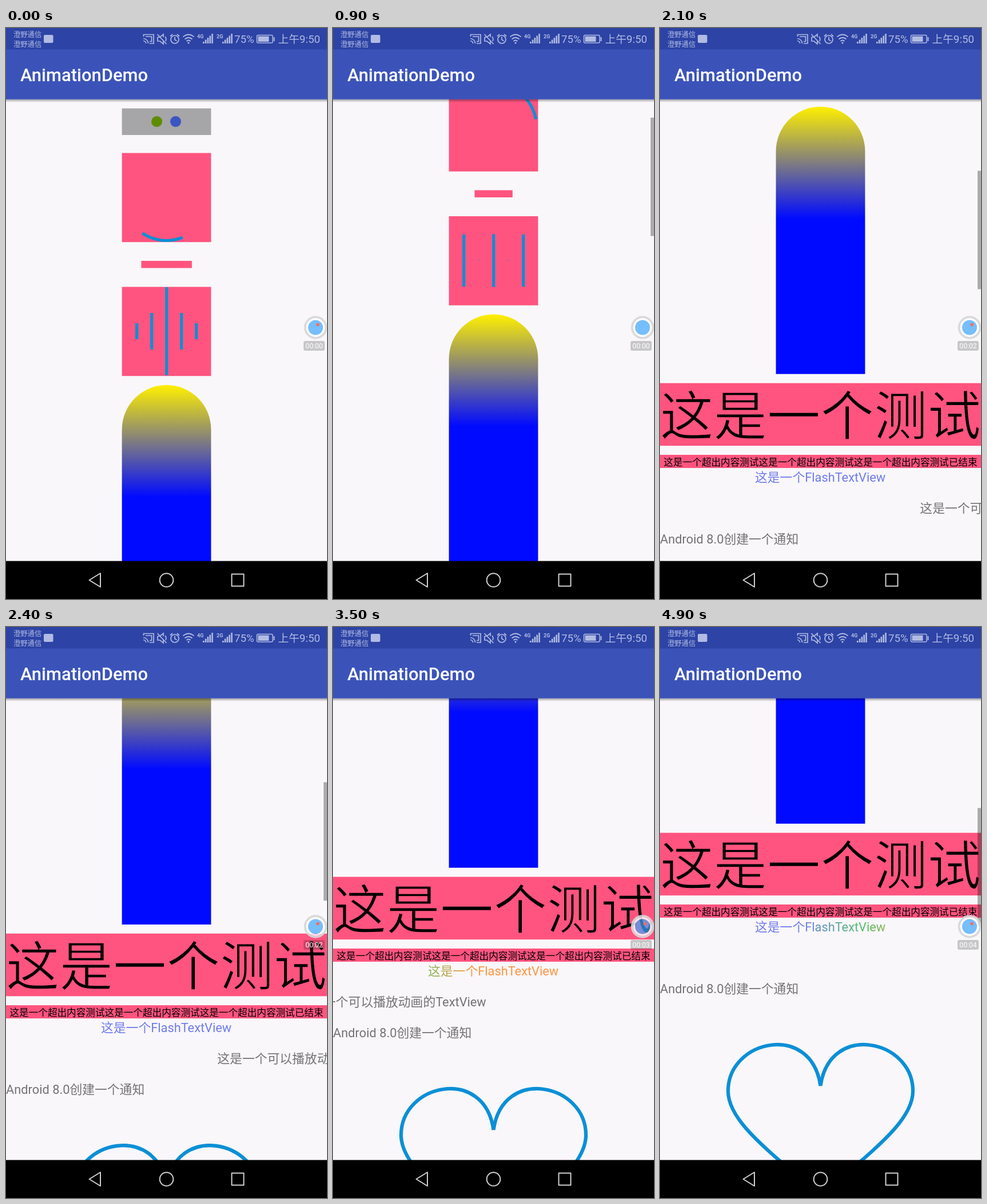
Animation, 561 px wide and 998 px high, one loop 5 s. Source, as an HTML page:

```html
<!DOCTYPE html>
<html lang="zh-CN">
<head>
<meta charset="utf-8">
<title>AnimationDemo</title>
<style>
  html, body { margin: 0; width: 100%; height: 100%; overflow: hidden; background: #f9f7fa; }
  svg { display: block; width: 561px; height: 998px; }
  text { font-family: Roboto, "Noto Sans CJK SC", "Noto Sans CJK", sans-serif; white-space: pre; }
  .pink { fill: #ff547f; }
  .line { fill: none; stroke: #0b8fd6; }
  .body { font-size: 21.8px; fill: #737275; }
  .status { fill: #b1bbe3; }
  .glyph { fill: none; stroke: #b1bbe3; stroke-width: 1.7; }
  .nav { fill: none; stroke: #d0d0d0; stroke-width: 2; stroke-linejoin: round; }
  /* The band-coloured outline thins the large glyphs. */
  .headline { font-size: 93.5px; stroke: #ff547f; stroke-width: 1.6px; }
</style>
</head>
<body>
<svg viewBox="0 0 561 998" lang="zh-CN">
  <defs>
    <linearGradient id="column" gradientUnits="userSpaceOnUse" x1="0" y1="624" x2="0" y2="820">
      <stop offset="0" stop-color="#fff000"/>
      <stop offset="1" stop-color="#000aff"/>
    </linearGradient>
    <linearGradient id="flash" gradientUnits="userSpaceOnUse" x1="166" y1="0" x2="395" y2="0">
      <stop offset="0" stop-color="#6f7bee"/>
      <stop offset=".5" stop-color="#52c264"/>
      <stop offset="1" stop-color="#ff9440"/>
    </linearGradient>
    <linearGradient id="shade" x1="0" y1="0" x2="0" y2="1">
      <stop offset="0" stop-color="#000" stop-opacity=".36"/>
      <stop offset="1" stop-color="#000" stop-opacity="0"/>
    </linearGradient>
    <clipPath id="page"><rect y="124" width="561" height="808"/></clipPath>
  </defs>

  <rect width="561" height="998" fill="#f9f7fa"/>

  <g clip-path="url(#page)">
    <g id="content">
      <rect x="202.600" y="140.500" width="155.800" height="46.500" fill="#a6a5a8"/>
      <circle id="dotA" cy="163.500" r="9.500" fill="#5f8d00"/>
      <circle id="dotB" cy="163.500" r="9.500" fill="#3c55c2"/>

      <rect class="pink" x="202.600" y="218.500" width="155.800" height="155.700"/>
      <path id="arc" class="line" stroke-width="5.200"/>

      <rect id="strip" class="pink" y="407" height="12.500"/>

      <rect class="pink" x="202.600" y="452.500" width="155.800" height="155.700"/>
      <path id="bars" class="line" stroke-width="5.200"/>

      <path d="M202.600 1091.300V701.900a77.900 77.900 0 0 1 155.800 0V1091.300Z" fill="url(#column)"/>

      <rect class="pink" y="1107.200" width="561" height="109.500"/>
      <text class="headline" x="0" y="1198">这是一个测试</text>
      <rect class="pink" y="1232.500" width="561" height="23"/>
      <text x="280.500" y="1251" font-size="16.620" text-anchor="middle">这是一个超出内容测试这是一个超出内容测试这是一个超出内容测试已结束</text>
      <text x="166" y="1279.500" font-size="21.800" fill="url(#flash)">这是一个FlashTextView</text>
      <text id="slide" class="body" y="1333">这是一个可以播放动画的TextView</text>
      <text class="body" x="0" y="1387">Android 8.0创建一个通知</text>

      <path class="line" stroke-width="6.200" d="M280.500 1549.500C264.500 1437.500 119 1468.500 119 1558.500C119 1612 190 1662 280.500 1742.500C371 1662 442 1612 442 1558.500C442 1468.500 296.500 1437.500 280.500 1549.500"/>
    </g>
    <rect id="thumb" x="555" width="6" height="207" fill="#000"/>
    <rect y="124.500" width="561" height="5.500" fill="url(#shade)"/>
  </g>

  <rect width="561" height="124.700" fill="#3b53b9"/>
  <rect width="561" height="37.500" fill="#2d43a5"/>
  <text x="25" y="93" font-size="30.950" font-weight="500" fill="#fff">AnimationDemo</text>

  <g class="status">
    <text x="13" y="15.500" font-size="12.300">澄野通信</text>
    <text x="13" y="32.500" font-size="12.300">澄野通信</text>
    <rect x="66" y="12" width="16.500" height="14" rx="2"/>
    <text x="334" y="17.500" font-size="9" font-weight="700">4G</text>
    <text x="368" y="17.500" font-size="9" font-weight="700">2G</text>
    <path id="signal"/>
    <text x="399" y="26" font-size="18.700">75%</text>
    <rect x="440.500" y="14.500" width="19" height="9.500"/>
    <rect x="467.500" y="16" width="2" height="7"/>
    <text x="475.500" y="26" font-size="18.700">上午9:50</text>
  </g>
  <g class="glyph">
    <path d="M240.500 15V11.500H258V27H251M240 18.500a8.500 8.500 0 0 1 8.500 8.500M240 22.500a4.500 4.500 0 0 1 4.500 4.500M244 15H254.500V23.500H251"/>
    <path d="M265 16h4l6-5v5M265 16v7h4l6 5v-6M264.500 11l16 17M278 15q3 4 1 8"/>
    <circle cx="295" cy="20" r="7"/>
    <path d="M295 15.500V20.500l3.500 2M287 14.500l4-3.500M303 14.500l-4-3.500"/>
    <path d="M309.500 15.500q9.500-8 19 0M312.500 19.500q6.500-5.500 13 0M315.500 23q3.500-3 7 0"/>
    <rect x="438.500" y="12.500" width="27.500" height="13.500" rx="2" stroke-width="1.500"/>
  </g>
  <circle class="status" cx="319" cy="26" r="1.600"/>

  <g>
    <circle cx="541" cy="523.500" r="18.300" fill="none" stroke="#d8d7db" stroke-opacity=".9" stroke-width="4"/>
    <circle cx="541" cy="523.500" r="14.700" fill="none" stroke="#fff" stroke-opacity=".85" stroke-width="3.400"/>
    <circle cx="541" cy="523.500" r="13" fill="#3fa5ff" fill-opacity=".7"/>
    <circle id="rec" cx="545" cy="518.500" r="2.800" fill="#f0705f"/>
    <rect x="520" y="547" width="37" height="17" rx="3" fill="#000" fill-opacity=".2"/>
    <text id="timer" x="538.500" y="560" font-size="12.200" text-anchor="middle" fill="#fff"></text>
  </g>

  <rect y="931.600" width="561" height="67" fill="#000"/>
  <g class="nav">
    <path d="M145.500 965L165 953V977Z"/>
    <circle cx="280.500" cy="965" r="11.800"/>
    <rect x="394.500" y="954.500" width="21" height="21"/>
  </g>
</svg>

<script>
const LOOP = 5000, STEP = 100;
const HOLDS = [[1100, 1500], [3000, 3200], [4300, 4600]];

// Tracks of [time, value], linear in between.
const SCROLL = [[500, 0], [900, 123.5], [1500, 312], [2100, 486.5], [2750, 670.5], [4500, 670.5], [4900, 747.5]];
const THUMB = [[400, 0], [500, 1], [3200, 1], [3500, 0], [4500, 0], [4600, 1]];
const WAVE = [[0, 0], [900, 0.204], [1500, 0.444], [2200, 0.7]];
const FLASH = [[0, 0], [2100, 0.67], [2800, 0.883], [4300, 1.383], [4900, 1.444]];

const $ = id => document.getElementById(id);
const set = (id, attrs) => {
  for (const name in attrs) $(id).setAttribute(name, attrs[name]);
};

function track(keys, t) {
  if (t <= keys[0][0]) return keys[0][1];
  for (let i = 1; i < keys.length; i++) {
    const [t0, a] = keys[i - 1], [t1, b] = keys[i];
    if (t <= t1) return a + (b - a) * (t - t0) / (t1 - t0);
  }
  return keys[keys.length - 1][1];
}

function sampled(t) {
  const hold = HOLDS.find(([from, to]) => t >= from && t < to);
  return hold ? hold[0] : Math.floor(t / STEP) * STEP;
}

function arcPath(from, to) {
  const at = deg => {
    const a = deg * Math.PI / 180;
    return (280.5 + 75.3 * Math.cos(a)).toFixed(2) + ' ' + (296.2 + 75.3 * Math.sin(a)).toFixed(2);
  };
  return `M${at(from)}A75.3 75.3 0 0 1 ${at(to)}`;
}

function barsPath(phase) {
  let d = '';
  for (let i = -2; i <= 2; i++) {
    const u = (0.497 + 0.297 * Math.abs(i) + phase) % 1;
    const h = 155 * (1 - Math.abs(2 * u - 1));
    d += `M${280.7 + 26 * i} ${530 - h / 2}v${h}`;
  }
  return d;
}

function signalPath() {
  let d = '';
  for (const x of [344, 378])
    for (let i = 0; i < 5; i++) d += `M${x + i * 3.8} 27v${-3 - i * 3.5}h2.6V27Z`;
  return d;
}

function draw(t) {
  const scroll = track(SCROLL, t);
  set('content', { transform: `translate(0 ${-scroll})` });
  set('thumb', { y: 125 + scroll * 0.256, 'fill-opacity': 0.31 * track(THUMB, t) });

  const swing = 30 * Math.sin(0.582 + t * Math.PI / 800);
  set('dotA', { cx: 280 - swing });
  set('dotB', { cx: 280 + swing });

  const head = 124 + 0.251 * t;
  set('arc', { d: arcPath(head - 56, head) });

  const width = (88.5 + t * 0.1482) % 155.5;
  set('strip', { x: 280.6 - width / 2, width });
  set('bars', { d: barsPath(track(WAVE, t)) });

  const shift = (track(FLASH, t) % 1 * 3 - 1) * 229;
  set('flash', { gradientTransform: `translate(${shift} 0)` });

  // Eased pass from the right edge to beyond the left one.
  const p = Math.min(1, Math.max(0, (t - 1266) / 4180));
  set('slide', { x: 561 * Math.cos(p * Math.PI) });

  set('rec', { visibility: t > 600 && t < 1800 ? 'hidden' : 'visible' });
  $('timer').textContent = '00:0' + Math.floor(t / 1000);
}

set('signal', { d: signalPath() });
const start = performance.now();
function tick() {
  draw(sampled((performance.now() - start) % LOOP));
  requestAnimationFrame(tick);
}
tick();
</script>
</body>
</html>
```
